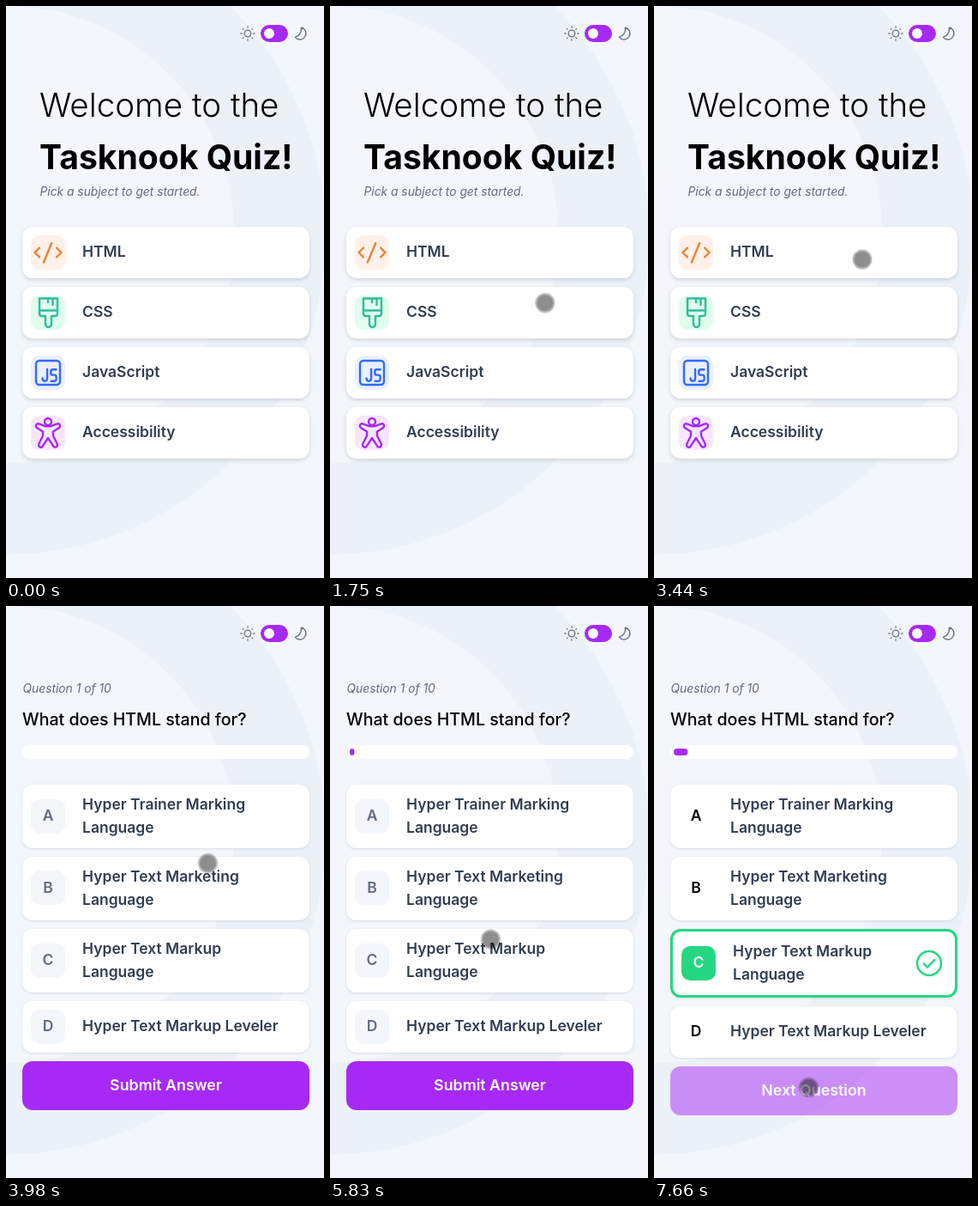
Animation of 371 by 666 pixels, one loop 7990 ms. Source, as an HTML page:

```html
<!DOCTYPE html>
<html lang="en">
<head>
<meta charset="utf-8">
<title>Quiz</title>
<style>
  html, body { margin: 0; width: 100%; height: 100%; overflow: hidden; background: #f3f6fb; }
  svg { display: block; }
  text { font-family: Inter, Roboto, sans-serif; fill: #313e51; }
  .label { font-size: 17.5px; font-weight: 600; }
  .note { font-size: 13.8px; font-style: italic; fill: #626c7f; }
  .light { font-size: 38.6px; font-weight: 300; fill: #000; }
  .bold { font-size: 39.1px; font-weight: 700; fill: #000; }
  .ask { font-size: 19.6px; font-weight: 500; fill: #000; }
  .key { font-size: 17.5px; font-weight: 600; fill: #626c7f; text-anchor: middle; }
  .btn { font-size: 17.8px; font-weight: 600; fill: #fff; text-anchor: middle; }
  .white { fill: #fff; }
  .card { fill: #fff; filter: drop-shadow(0 1px 1.5px rgba(49, 62, 81, .14)); }
  .home .card { filter: drop-shadow(0 2.5px 2px rgba(49, 62, 81, .18)); }
  .line { fill: none; stroke-width: 2.4; stroke-linecap: round; stroke-linejoin: round; }
  .tile { fill: #f3f6fb; }

  .home, .quiz, .idle, .picked, .done, .ask-btn, .low, .fade, .bar, .cursor, .swap, .quiz .tile {
    animation: 7990ms step-end infinite;
  }
  .home { animation-name: home; }
  .quiz { animation-name: quiz; }
  .idle { animation-name: idle; }
  .picked { animation-name: picked; }
  .done { animation-name: done; }
  .ask-btn, .quiz .tile { animation-name: until-done; }
  .low { animation-name: drop; }
  .swap { animation-name: ink; }
  .fade { animation-name: fade; animation-timing-function: ease; }
  .bar { animation-name: grow; animation-timing-function: ease; }
  .cursor { animation-name: travel; animation-timing-function: linear; }

  @keyframes home { 0% { opacity: 1 } 48.06%, 100% { opacity: 0 } }
  @keyframes quiz { 0% { opacity: 0 } 48.06%, 100% { opacity: 1 } }
  @keyframes idle { 0% { opacity: 1 } 75.84%, 100% { opacity: 0 } }
  @keyframes picked { 0% { opacity: 0 } 75.84% { opacity: 1 } 91.74%, 100% { opacity: 0 } }
  @keyframes done { 0% { opacity: 0 } 91.74%, 100% { opacity: 1 } }
  @keyframes until-done { 0% { opacity: 1 } 91.74%, 100% { opacity: 0 } }
  @keyframes drop { 0% { transform: none } 75.84%, 100% { transform: translateY(6px) } }
  @keyframes ink { 0% { fill: #626c7f } 91.74%, 100% { fill: #000 } }
  @keyframes fade { 0%, 91.74% { opacity: 1 } 95.5%, 100% { opacity: .5 } }
  @keyframes grow {
    0%, 61.7% { width: 0 }
    64.96%, 74.22% { width: 5.5px }
    77.47%, 86.73% { width: 11px }
    89.99%, 100% { width: 16.4px }
  }
  @keyframes travel {
    0%, 8.3% { transform: translate(198px, 690px) }
    8.39% { transform: translate(198px, 668px) }
    14.39% { transform: translate(192.5px, 586px) }
    17.65% { transform: translate(272px, 399px) }
    20.03% { transform: translate(275px, 385px) }
    23.15% { transform: translate(235px, 320px) }
    26.28% { transform: translate(170px, 273px) }
    27.91% { transform: translate(158px, 288px) }
    29.54%, 33.67% { transform: translate(158.5px, 292.5px) }
    38.8% { transform: translate(200px, 289px) }
    43.05% { transform: translate(243px, 295px) }
    45.56% { transform: translate(237.5px, 299px) }
    49.81%, 51.44% { transform: translate(235.5px, 299.5px) }
    57.32% { transform: translate(192px, 340px) }
    67.83% { transform: translate(190px, 364px) }
    72.97% { transform: translate(187.5px, 388px) }
    80.48% { transform: translate(187px, 390px) }
    86.86% { transform: translate(174.5px, 542px) }
    90.24% { transform: translate(180px, 559.5px) }
    95.87%, 100% { transform: translate(180.5px, 560.5px) }
  }
</style>
</head>
<body>
<svg width="371" height="666" viewBox="0 0 371 666">
  <rect width="371" height="666" fill="#f3f6fb"/>
  <circle cx="0" cy="266" r="319.5" fill="none" stroke="#ecf1f8" stroke-width="106"/>

  <!-- theme switch -->
  <g class="line" stroke="#626c7f" style="stroke-width:1.3">
    <circle cx="282" cy="32" r="3.8"/>
    <path d="M282 24v1M282 39v1M274 32h1M289 32h1M276.4 26.4l.7.7M286.9 36.9l.7.7M276.4 37.6l.7-.7M286.9 27.1l.7-.7"/>
    <path d="M344.4 25.2A7 7 0 1 1 337.4 36.4A10 10 0 0 0 344.4 25.2Z"/>
  </g>
  <rect x="297" y="22" width="32" height="20" rx="10" fill="#a729f5"/>
  <circle cx="307" cy="32" r="6" fill="#fff"/>

  <g class="home">
    <text class="light" x="39" y="129">Welcome to the</text>
    <text class="bold" x="39" y="189.5">Tasknook Quiz!</text>
    <text class="note" x="39.5" y="221">Pick a subject to get started.</text>

    <rect class="card" x="19" y="257" width="335" height="60" rx="12"/>
    <rect class="card" x="19" y="327" width="335" height="60" rx="12"/>
    <rect class="card" x="19" y="397" width="335" height="60" rx="12"/>
    <rect class="card" x="19" y="467" width="335" height="60" rx="12"/>

    <rect x="29" y="267" width="40" height="40" rx="10" fill="#fff1e9"/>
    <path class="line" stroke="#eb8232" d="M39 281.5L33.5 287L39 292.5M53.3 276L43.8 298.5M59 281.5L64.5 287L59 292.5"/>
    <rect x="29" y="337" width="40" height="40" rx="10" fill="#e0fdef"/>
    <path class="line" stroke="#2fbe9a" d="M39 340.5H60V358q0 3-3 3H53V370.5a3.5 3.5 0 0 1-7 0V361H42q-3 0-3-3ZM39 354.5H60M49 341v4M54.5 341v7"/>
    <rect x="29" y="407" width="40" height="40" rx="10" fill="#ebf0ff"/>
    <g class="line" stroke="#306aff">
      <rect x="35" y="413" width="28" height="28" rx="4"/>
      <path d="M42.5 433.5q0 3.2 2.8 3.2t2.8-3.2V423M58.5 423.2H54.5a2.2 2.2 0 0 0-2.2 2.2v2a2.2 2.2 0 0 0 2.2 2.2h1.9a2.2 2.2 0 0 1 2.2 2.2v2.7a2.2 2.2 0 0 1-2.2 2.2H52.5"/>
    </g>
    <rect x="29" y="477" width="40" height="40" rx="10" fill="#f6e7ff"/>
    <g class="line" stroke="#a729f5">
      <circle cx="49" cy="484" r="4"/>
      <path d="M46 489.3L38.8 486.7a2.6 2.6 0 0 0-2.6 4.5L43 495.5v5L38.3 509.8a2.6 2.6 0 0 0 4.7 2.4L49 503L55 512.2a2.6 2.6 0 0 0 4.7-2.4L55 500.5v-5L61.8 491.2a2.6 2.6 0 0 0-2.6-4.5L52 489.3Z"/>
    </g>

    <text class="label" x="89" y="292">HTML</text>
    <text class="label" x="89" y="362">CSS</text>
    <text class="label" x="89" y="432">JavaScript</text>
    <text class="label" x="89" y="502">Accessibility</text>
  </g>

  <g class="quiz">
    <text class="note" x="19.5" y="101">Question 1 of 10</text>
    <text class="ask" x="19" y="139">What does HTML stand for?</text>
    <rect x="19" y="162" width="335" height="16" rx="8" fill="#fff"/>
    <rect class="bar" x="23" y="166" width="0" height="8" rx="4" ry="4" fill="#a729f5"/>

    <rect class="card" x="19" y="208" width="335" height="74" rx="12"/>
    <rect class="tile" x="29" y="225" width="40" height="40" rx="10"/>
    <text class="key swap" x="49" y="250">A</text>
    <text class="label" x="89" y="237">Hyper Trainer Marking<tspan x="89" dy="27">Language</tspan></text>

    <rect class="card" x="19" y="292" width="335" height="74" rx="12"/>
    <rect class="tile" x="29" y="308" width="40" height="40" rx="10"/>
    <text class="key swap" x="49" y="334">B</text>
    <text class="label" x="89" y="321">Hyper Text Marketing<tspan x="89" dy="27">Language</tspan></text>

    <g class="idle">
      <rect class="card" x="19" y="376" width="335" height="74" rx="12"/>
      <rect class="tile" x="29" y="393" width="40" height="40" rx="10"/>
      <text class="key" x="49" y="418">C</text>
      <text class="label" x="89" y="405">Hyper Text Markup<tspan x="89" dy="27">Language</tspan></text>
    </g>
    <g class="picked">
      <rect class="card" x="20.5" y="377.5" width="332" height="77" rx="10.5" stroke="#a729f5" stroke-width="3"/>
      <rect x="32" y="396" width="40" height="40" rx="10" fill="#a729f5"/>
      <text class="key white" x="52" y="421">C</text>
      <text class="label" x="92" y="408">Hyper Text Markup<tspan x="92" dy="27">Language</tspan></text>
    </g>
    <g class="done">
      <rect class="card" x="20.5" y="377.5" width="332" height="77" rx="10.5" stroke="#26d782" stroke-width="3"/>
      <rect x="32" y="396" width="40" height="40" rx="10" fill="#26d782"/>
      <text class="key white" x="52" y="421">C</text>
      <text class="label" x="92" y="408">Hyper Text Markup<tspan x="92" dy="27">Language</tspan></text>
      <g class="line" stroke="#26d782">
        <circle cx="321" cy="416" r="14"/>
        <path d="M314.8 416.5l4.2 4.2 8.2-8.6"/>
      </g>
    </g>

    <g class="low">
      <rect class="card" x="19" y="460" width="335" height="60" rx="12"/>
      <rect class="tile" x="29" y="470" width="40" height="40" rx="10"/>
      <text class="key swap" x="49" y="495">D</text>
      <text class="label" x="89" y="495">Hyper Text Markup Leveler</text>
      <g class="fade">
        <rect x="19" y="530" width="335" height="57" rx="12" fill="#a729f5"/>
        <text class="btn ask-btn" x="186.5" y="564">Submit Answer</text>
        <text class="btn done" x="186.5" y="564">Next Question</text>
      </g>
    </g>
  </g>

  <g class="cursor">
    <circle r="11.5" fill="#000" fill-opacity=".27"/>
    <circle r="9.6" fill="#000" fill-opacity=".24"/>
  </g>
</svg>
</body>
</html>
```
